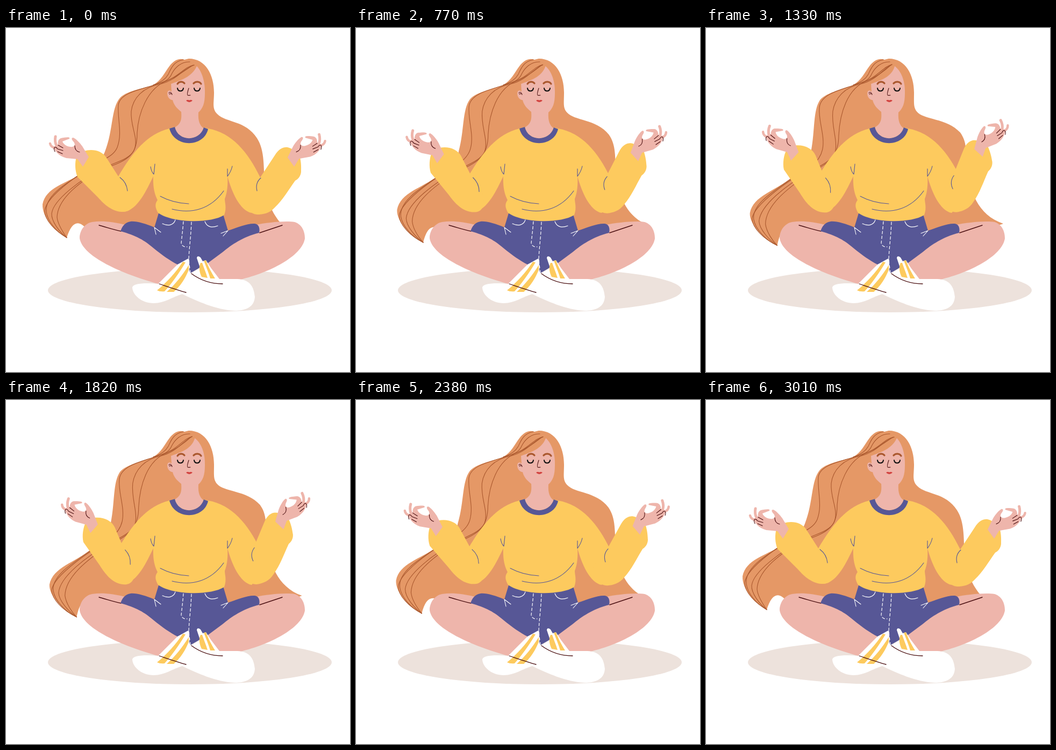
An HTML page with a canvas for the animation above (3.08 s loop, 640 by 640 pixels).

```html
<!DOCTYPE html>
<html lang="en">
<head>
<meta charset="utf-8">
<title>Meditation</title>
<style>
html, body { margin: 0; width: 100%; height: 100%; overflow: hidden; background: #fff; }
canvas { display: block; width: 640px; height: 640px; }
</style>
</head>
<body>
<canvas id="stage" width="640" height="640"></canvas>
<script>
const ctx = document.getElementById('stage').getContext('2d');
const STEP = 70, LOOP = 3080, SWAY = 3010;
const C = {
  skin: '#eeb5ab', hair: '#e59866', strand: '#aa582e', wool: '#fdca5e',
  denim: '#575796', dark: '#4a0f10', floor: '#ede2dc', white: '#fff'
};

// Blend two paths that share the same commands.
function mix(a, b, k) {
  const to = b.match(/-?[\d.]+/g);
  let i = 0;
  return a.replace(/-?[\d.]+/g, n => +n + (to[i++] - n) * k);
}
function fill(d, color) {
  ctx.fillStyle = color;
  ctx.fill(new Path2D(d));
}
function line(d, color, width = 1.1, dash = []) {
  ctx.strokeStyle = color;
  ctx.lineWidth = width;
  ctx.setLineDash(dash);
  ctx.stroke(new Path2D(d));
}
// Draw with a rotation about a pivot, after a shift.
function turned(x, y, angle, dx, dy, draw) {
  ctx.save();
  ctx.translate(x + dx, y + dy);
  ctx.rotate(angle);
  ctx.translate(-x, -y);
  draw();
  ctx.restore();
}

const crown = 'C289 97 295 83 304 71 C312 60 322 55 332 59 Z';
const mane = [
  'M340 57 C372 57 387 88 387 120 C387 140 383 150 393 160 C410 177 445 171 467 205 ' +
  'C482 228 479 262 481 290 C484 320 496 346 512 364 C500 400 300 410 150 374 ' +
  'C134 355 122 362 113 390 C90 377 67 352 68 328 C74 297 110 290 140 271 ' +
  'C155 262 178 248 184 230 C200 190 195 150 212 130 C227 115 258 113 274 106 ' + crown,
  'M340 57 C372 57 387 88 387 120 C387 140 386 147 392 155 C404 171 448 167 473 194 ' +
  'C486 212 483 225 486 260 C490 300 505 348 554 364 C530 374 300 410 165 372 ' +
  'C142 372 138 382 133 405 C107 391 81 366 82 345 C88 312 130 304 160 278 ' +
  'C180 262 197 246 196 228 C203 190 199 154 212 134 C225 119 258 114 274 106 ' + crown
];
const strands = [
  ['M350 69 C330 72 320 95 284 103 C262 113 213 117 209 143 C207 170 217 195 207 222 C203 232 195 238 180 246 C150 262 75 310 72 340 C72 358 92 378 113 390',
   'M346 68 C328 72 318 95 284 103 C262 113 214 119 211 148 C209 175 222 200 217 226 C214 240 206 250 196 258 C170 275 90 325 86 355 C87 372 106 392 133 405'],
  ['M350 69 C330 75 318 97 288 104 C255 110 236 130 233 155 C231 185 248 205 238 228 C228 246 200 250 180 262 C140 280 88 320 85 345 C84 360 100 380 113 390',
   'M346 68 C330 75 318 97 288 104 C258 110 240 130 236 155 C233 185 246 210 240 232 C232 248 215 256 196 266 C150 292 101 330 99 360 C100 375 118 395 133 405'],
  ['M348 69 C332 80 315 92 300 98 C262 112 246 160 244 195 C244 235 230 246 180 262 C130 290 96 320 95 352 C96 365 106 380 113 390',
   'M345 68 C332 80 315 92 300 98 C262 112 249 160 247 200 C247 235 232 252 196 268 C150 300 112 330 111 365 C113 380 124 396 133 405'],
  ['M140 272 C105 292 72 315 75 342 C77 360 95 380 113 390',
   'M160 280 C125 305 86 328 89 356 C92 374 110 394 133 405']
];

function drawHair(k) {
  fill(mix(...mane, k), C.hair);
  for (const s of strands) line(mix(...s, k), C.strand);
  line('M342 63 C325 62 314 75 309 84 C304 96 296 101 274 106', C.strand);
  line('M330 59 C312 62 307 75 302 86 C297 95 290 100 274 106', C.strand);
}

function drawHead(k) {
  const tip = 355 - 4 * k;
  fill(`M${tip} 71 C366 82 371 105 370 122 C370 140 366 150 358 157 C357 172 360 181 368 187
    L366 208 L318 208 L314 185 C326 178 327 170 326 156 C316 148 312 142 310 134
    C303 134 298 124 301 118 C303 115 307 116 308 119 L307 104 C325 97 345 92 ${tip} 71Z`, C.skin);
  line('M319 104 C322 99 329 99 332 103', C.strand, 3.2);
  line('M349 103 C353 99 360 99 363 104', C.strand, 3.2);
  line('M319 112 C320 119 329 119 330 112', '#111', 2);
  line('M350 112 C351 119 360 119 361 112', '#111', 2);
  line('M340 112 C338 118 336 124 338 125 C340 126 342 125 343 125', C.dark);
  line('M303 121 C305 118 308 120 309 124 M304 123 L307 122', C.dark);
  fill('M335 135 Q338 133 341 134.5 Q344 133 347 135 Q341 141 335 135Z', '#d2423f');
}

function drawLegs() {
  fill('M222 366 C200 361 180 358 160 361 C145 364 137 378 137 391 C142 425 215 457 283 476 L345 436 L300 380Z', C.skin);
  fill('M465 366 C485 362 520 358 537 361 C552 366 556 380 556 392 C550 425 490 455 436 468 L397 468 L360 430 L440 380Z', C.skin);
  line('M173 367 C188 371 202 376 214 378', C.dark, 1.4);
  line('M472 381 L514 367', C.dark, 1.4);
  fill(`M286 338 L276 371 C260 364 242 359 232 360 C222 361 216 369 213 378
    C242 386 258 395 275 410 C290 422 305 433 319 440 L343 456 L376 437 L403 417
    C420 403 440 389 471 381 C473 372 470 365 463 364 C450 363 430 371 413 377 L402 340Z`, C.denim);
  line('M291 364 C302 369 312 367 315 357 M370 360 C374 371 384 372 394 368', C.white);
  line('M288 380 L276 371 L279 384 M400 382 L413 377 L404 387', C.white);
  line('M330 360 C329 375 327 390 326 400 Q328 408 337 407', C.white, 1.2, [5, 4]);
  line('M345 361 C344 390 340 415 340 432 L343 455', C.white, 1.2, [5, 4]);
}

function drawShoes() {
  fill(`M283 476 L319 440 L337 430 Q342 427 341 438 L341 452 L344 457 L361 446 L355 428
    Q356 422 362 427 L366 434 L372 432 L381 446 L397 467 L430 467 C455 468 461 482 463 500
    C462 518 448 526 425 526 C390 524 355 508 328 495 C310 500 295 512 275 512
    C252 512 236 497 235 483 C236 474 262 474 283 476Z`, C.white);
  fill('M329 435 L334 436 C322 456 308 476 295 490 Q286 491 281 488 C299 474 317 453 329 435Z', C.wool);
  fill('M340 441 L340 450 C334 465 325 480 312 491 L299 491 C316 476 328 460 340 441Z', C.wool);
  fill('M362 437 C358 445 360 455 364 463 L375 465 C372 455 368 446 365 437Z', C.wool);
  fill('M368 433 L372 432 C377 446 383 456 389 466 L380 466 C377 455 372 444 368 433Z', C.wool);
  line('M285 476 C300 481 320 488 335 492', C.dark, 1.3);
  line('M345 457 C360 468 380 476 403 476', C.dark, 1.3);
}

function drawTorso() {
  fill(`M304 187 C262 197 235 232 209 276 L205 325 L218 342 C245 340 262 300 274 276
    C273 300 278 312 282 320 C276 328 278 335 283 344 C310 363 380 364 406 348
    C411 335 407 325 407 318 C412 305 413 290 412 276 C420 305 435 340 457 344
    L468 332 L473 278 C450 230 420 195 376 187 L368 185 C360 212 320 212 314 184Z`, C.wool);
  line('M277 253 L275 272 C273 270 270 265 269 258', C.denim);
  line('M412 262 L412 276 C415 272 419 266 421 257', C.denim);
  line('M287 313 C300 320 315 326 340 327', C.denim);
  line('M309 337 C345 346 380 338 405 303', C.denim);
  fill('M304 187 L314 184 C320 212 360 212 368 185 L376 188 C368 223 313 223 304 187Z', C.denim);
}

function drawHand() {
  fill(`M88 221 C92 230 98 238 112 242 L133 244 L143 258 L154 240 L142 220
    C137 213 130 206 125 204 C121 204 122 208 126 212 C130 217 127 222 120 221
    C110 220 106 214 105 211 L118 206 C120 202 112 203 102 205 C97 207 96 213 97 217Z`, C.skin);
  line('M94 219 C91 213 91 207 92 202', C.skin, 5);
  line('M91 223 C86 222 83 219 82 215', C.skin, 4.5);
  line('M91 230 C87 222 92 219 96 225 L106 228 M97 218 L106 223 M96 230 L105 234', C.dark);
  line('M128 219 C128 226 132 230 137 231', C.dark);
}

function drawArms(p) {
  turned(212, 335, 0.19 * p, 0, 0, () => {
    fill(`M131 240 C135 233 140 230 145 229 C160 224 178 228 186 240 L209 276
      C225 292 240 310 236 330 C232 341 223 342 215 342 C195 341 180 325 170 314
      L133 277 C128 265 128 250 131 240Z`, C.wool);
    line('M212 278 C220 284 225 292 226 303', C.denim);
    drawHand();
  });
  turned(465, 335, -0.207 * p, -1.5 * p, -4 * p, () => {
    fill(`M473 278 L500 237 C508 224 517 221 524 222 C533 224 540 231 546 236
      C550 252 549 262 549 268 C548 277 542 282 538 284 C525 302 515 320 500 334
      C490 345 478 347 467 347 C455 346 445 335 440 322 C445 300 460 295 473 278Z`, C.wool);
    line('M474 279 C466 286 465 295 467 303', C.denim);
  });
  turned(465, 335, -0.207 * p, -5 * p, -6 * p, () => {
    turned(536, 255, -0.08, 0, 0, () => {
      ctx.translate(679, 0);
      ctx.scale(-1, 1);
      drawHand();
    });
  });
}

function draw(t) {
  const p = (1 - Math.cos(2 * Math.PI * t / SWAY)) / 2;
  const k = Math.pow(p, 0.78);
  ctx.clearRect(0, 0, 640, 640);
  ctx.lineCap = ctx.lineJoin = 'round';
  ctx.fillStyle = C.floor;
  ctx.beginPath();
  ctx.ellipse(342, 488, 264, 41, 0, 0, 7);
  ctx.fill();
  drawHair(k);
  drawHead(k);
  drawLegs();
  drawShoes();
  drawTorso();
  drawArms(p);
}

const start = performance.now();
function tick() {
  const t = (performance.now() - start) % LOOP;
  draw(Math.floor(t / STEP) * STEP);
  requestAnimationFrame(tick);
}
tick();
</script>
</body>
</html>
```
